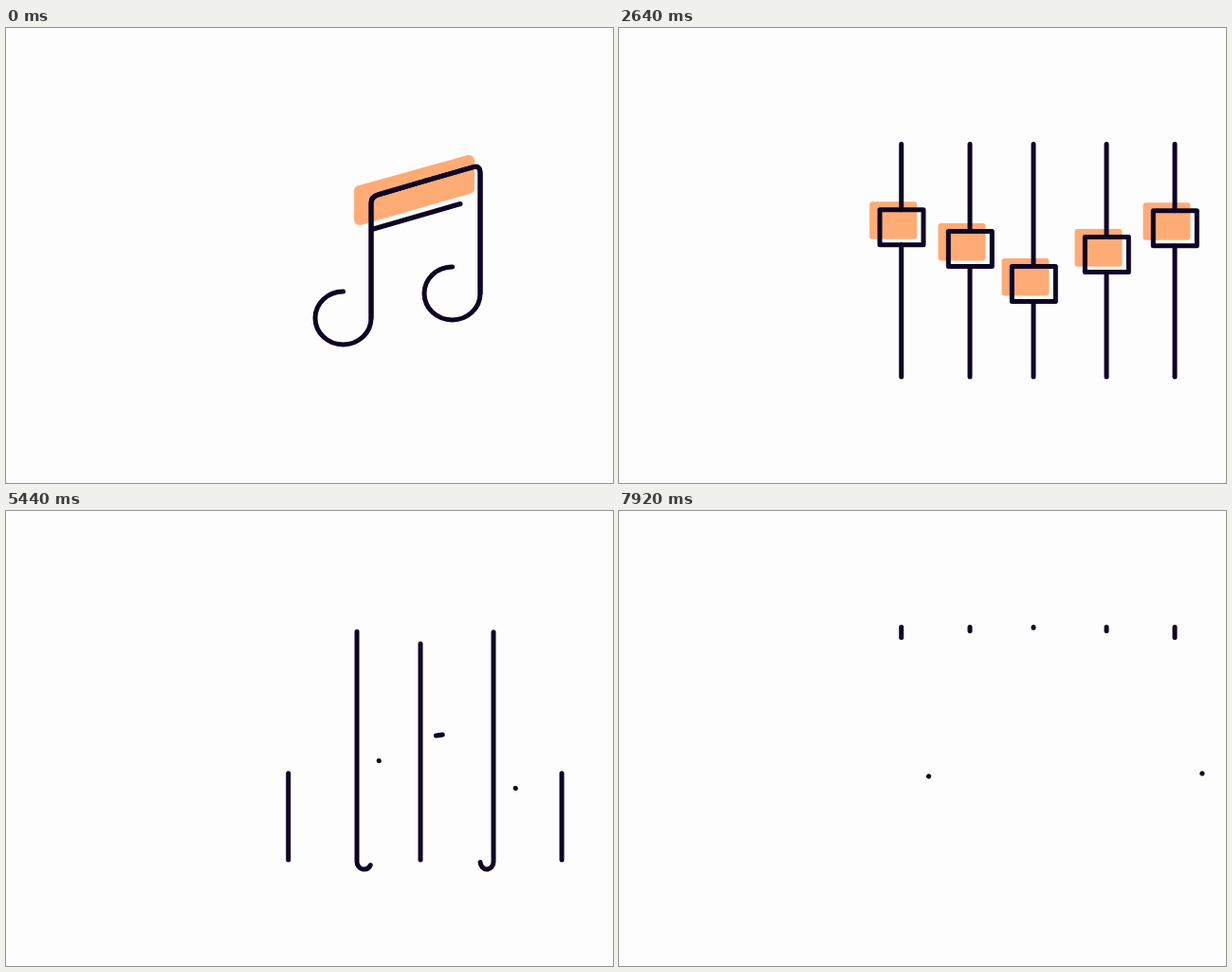
Write an HTML page that moves like this. It is 640 by 480 pixels and loops after 8000 ms.

```html
<!DOCTYPE html>
<html lang="en">
<head>
<meta charset="utf-8">
<title>Note and sliders</title>
<style>
  html, body { margin: 0; width: 100%; height: 100%; overflow: hidden; background: #fdfdfd; }
  svg { display: block; width: 100%; height: 100%; }
  .ink { fill: none; stroke: #0e0424; stroke-width: 5; stroke-linecap: round; stroke-linejoin: round; }
  .tint { fill: #ffab76; }
  #beam { stroke: #ffab76; stroke-width: 12; stroke-linejoin: round; }
</style>
</head>
<body>
<svg id="stage" viewBox="0 0 640 480"></svg>
<script>
const LOOP = 8000, CYCLE = 4440, TOP = 122.5, BOTTOM = 368;
const stage = document.getElementById('stage');

function add(tag, cls, attrs = {}, parent = stage) {
  const el = document.createElementNS('http://www.w3.org/2000/svg', tag);
  el.setAttribute('class', cls);
  set(el, attrs);
  return parent.appendChild(el);
}
function set(el, attrs) {
  for (const name in attrs) el.setAttribute(name, attrs[name]);
}
function show(el, on) { el.style.display = on ? '' : 'none'; }

// Draws only the part of a path between two lengths.
function trim(el, from, to) {
  show(el, to - from > 0.02);
  set(el, { 'stroke-dasharray': `${Math.max(to - from, 0)} 9999`, 'stroke-dashoffset': -from });
}

const clamp = v => Math.min(1, Math.max(0, v));
const mix = (a, b, k) => a + (b - a) * k;
const mixPoint = (p, q, k) => [mix(p[0], q[0], k), mix(p[1], q[1], k)];
function ramp(t, start, end) {
  const u = clamp((t - start) / (end - start));
  return u < 0.5 ? 4 * u ** 3 : 1 - 4 * (1 - u) ** 3;
}

// Monotone cubic curve through the given keys.
function curve(times, values, t) {
  const last = times.length - 1;
  if (t <= times[0]) return values[0];
  if (t >= times[last]) return values[last];
  const slope = i => (values[i + 1] - values[i]) / (times[i + 1] - times[i]);
  const tangent = i => {
    if (i === 0 || i === last) return 0;
    const a = slope(i - 1), b = slope(i);
    return a * b <= 0 ? 0 : 2 * a * b / (a + b);
  };
  let i = 0;
  while (t > times[i + 1]) i++;
  const span = times[i + 1] - times[i], u = (t - times[i]) / span;
  return values[i] * (1 + 2 * u) * (1 - u) ** 2 + values[i + 1] * u * u * (3 - 2 * u)
    + span * u * (1 - u) * (tangent(i) * (1 - u) - tangent(i + 1) * u);
}

/* Note */
const beam = add('path', 'tint', { id: 'beam' });
const beamCorners = { tl: [373, 172], tr: [488, 140], br: [488, 169], bl: [373, 202] };
const underline = add('path', 'ink', { d: 'M387.5 212L479 185.5' });

const halves = [
  { start: 'M442.5 161.2L392 176Q385 178 385 185', x: 385, foot: 306, turn: 'a7.5 8 0 0 1 -15 0' },
  { start: 'M442.5 161.2L492 146.8Q500 144.5 500 153', x: 500, foot: 280, turn: 'a7 8 0 0 0 14 0' }
].map(half => {
  const stem = add('path', 'ink', { d: `${half.start}V${half.foot}` });
  half.stemLength = stem.getTotalLength();
  stem.remove();
  half.note = add('path', 'ink');
  half.route = add('path', 'ink', { d: `${half.start}V370${half.turn}` });
  half.turnEnd = half.route.getTotalLength();
  half.route.setAttribute('d', `${half.start}V370${half.turn}V${TOP}`);
  half.total = half.route.getTotalLength();
  return half;
});

function drawNote(t) {
  const entering = t > 2400;
  const grown = (a, b, c, d) => entering ? ramp(t, a, b) : 1 - ramp(t, c, d);

  const { tl, tr, br, bl } = beamCorners;
  const drop = grown(3620, 3860, 520, 740);
  const lowRight = mixPoint(tr, br, drop);
  const lowLeft = mixPoint(lowRight, bl, grown(3720, 4040, 420, 640));
  const topLeft = mixPoint(lowLeft, tl, grown(4070, 4400, 240, 480));
  show(beam, drop > 0.01);
  beam.setAttribute('d', `M${topLeft}L${tr}L${lowRight}L${lowLeft}Z`);

  trim(underline, 0, 95.3 * grown(4060, 4440, 220, 480));

  const sag = entering ? 5 * (1 - ramp(t, 3850, 4300)) : 0;
  for (const h of halves) {
    const y = h.foot + sag;
    h.note.setAttribute('d', `${h.start}V${y}A29.5 28 0 1 1 ${h.x - 29.5} ${y - 28}`);
    const full = h.note.getTotalLength();
    if (entering) {
      trim(h.note, 0, full * ramp(t, 3550, 4300));
      show(h.route, false);
    } else {
      const tail = h.turnEnd * ramp(t, 400, 1220);
      trim(h.note, tail, mix(full, h.stemLength, ramp(t, 220, 560)));
      trim(h.route, tail, mix(h.stemLength, h.total, ramp(t, 300, 1130)));
      if (t >= 1220) show(h.route, false);
    }
  }
}

/* Sliders */
const keyTimes = [1000, 1760, 2440, 2640, 2920, 3480];
const outer = { grow: [770, 1280], shrink: [3000, 3619], boxIn: [1050, 1600], boxOut: [2900, 3520] };
const inner = { grow: [1219, 1220], shrink: [2960, 3579], boxIn: [970, 1500], boxOut: [2860, 3400] };
const middle = { grow: [560, 1157], shrink: [2920, 3540], boxIn: [900, 1360], boxOut: [2860, 3380] };

const sliders = [
  { x: 297.7, y: [275, 236, 181, 210, 318, 287], ...outer },
  { x: 370, y: [282, 220, 236, 233, 236, 240], ...inner },
  { x: 437, y: [254.5, 217.5, 298, 270, 240, 232], ...middle },
  { x: 514, y: [311, 258, 233, 239, 246, 250], ...inner },
  { x: 586, y: [310, 284, 184, 211, 316, 284], ...outer }
].map(s => {
  s.patch = add('rect', 'tint', { rx: 3 });
  s.upper = add('path', 'ink');
  s.lower = add('path', 'ink');
  s.box = add('path', 'ink', { d: 'M23 -18.5H-23V18.5H23Z' });
  return s;
});

function drawSegment(el, x, from, to) {
  show(el, to > from);
  el.setAttribute('d', `M${x} ${from}V${to}`);
}

function drawSlider(s, t) {
  const y = curve(keyTimes, s.y, t);
  const enter = ramp(t, ...s.boxIn), leave = ramp(t, ...s.boxOut);
  const drawn = enter * (1 - leave);
  const gap = 18.5 * clamp((drawn - 0.2) / 0.6);

  const top = mix(BOTTOM, TOP, ramp(t, ...s.grow));
  const bottom = mix(BOTTOM, TOP, ramp(t, ...s.shrink));
  if (gap > 0) {
    drawSegment(s.upper, s.x, top, Math.min(bottom, y - gap));
    drawSegment(s.lower, s.x, Math.max(top, y + gap), bottom);
  } else {
    drawSegment(s.upper, s.x, top, bottom);
    show(s.lower, false);
  }

  trim(s.box, 0, 166 * drawn);
  s.box.setAttribute('transform',
    `translate(${s.x + 0.3} ${y}) rotate(${25 * leave}) rotate(${-8 * (1 - enter)} 23 -18.5)`);

  const [start] = s.boxIn;
  const size = ramp(t, start + 150, start + 580) * (1 - ramp(t, 2880, 3300));
  show(s.patch, size > 0.01);
  set(s.patch, {
    x: s.x - 8.5 - 25 * size, y: y - 7.2 - 19.8 * size,
    width: 50 * size, height: 39.6 * size
  });
}

const begin = performance.now();
function frame() {
  const t = (performance.now() - begin) % LOOP % CYCLE;
  drawNote(t);
  sliders.forEach(s => drawSlider(s, t));
  requestAnimationFrame(frame);
}
frame();
</script>
</body>
</html>
```
